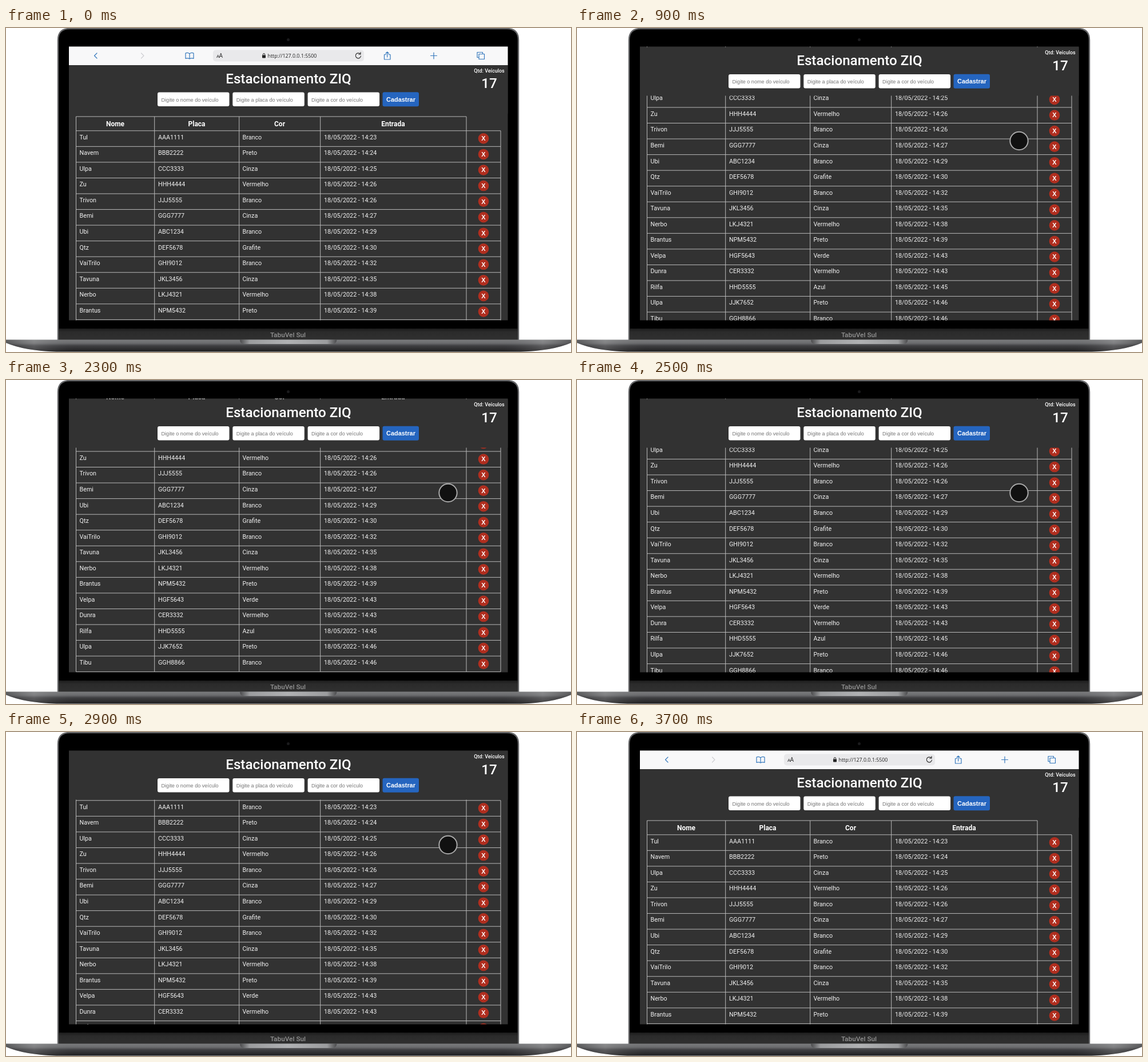
These frames come from a looping animation (988x567 px, 4.6 s). An HTML page:

```html
<!DOCTYPE html>
<html lang="pt-BR">
<head>
<meta charset="utf-8">
<title>Estacionamento</title>
<style>
  html, body { margin: 0; width: 100%; height: 100%; overflow: hidden; background: #fff; }
  svg { display: block; width: 988px; height: 567px; }
  text { font-family: Roboto, sans-serif; fill: #fff; }
  .mid { text-anchor: middle; }
  .head { font-size: 12px; font-weight: 600; }
  .cell { font-size: 10.75px; fill: #f2f2f2; }
  .hint { font: 9.1px "Liberation Sans", Arial, sans-serif; fill: #757575; }
  .button { font: bold 10.9px "Liberation Sans", Arial, sans-serif; }
  .icon { fill: none; stroke: #3578bd; stroke-width: 1.2; stroke-linecap: round; stroke-linejoin: round; }
  .grid { fill: none; stroke: #b9b9b9; stroke-width: 1; }
</style>
</head>
<body>
<svg viewBox="0 0 988 567">
  <defs>
    <clipPath id="screen"><rect x="110" y="32.500" width="767.500" height="479"/></clipPath>
    <linearGradient id="chin" x2="0" y2="1">
      <stop stop-color="#1c1c1c"/><stop offset=".3" stop-color="#2b2b2b"/><stop offset="1" stop-color="#303030"/>
    </linearGradient>
    <linearGradient id="base" x2="0" y2="1">
      <stop stop-color="#88898b"/><stop offset=".3" stop-color="#737477"/>
      <stop offset=".5" stop-color="#444447"/><stop offset="1" stop-color="#1d1d1f"/>
    </linearGradient>
    <linearGradient id="shine">
      <stop stop-color="#222" stop-opacity=".4"/><stop offset=".05" stop-color="#999" stop-opacity=".3"/>
      <stop offset=".12" stop-color="#222" stop-opacity=".12"/><stop offset=".88" stop-color="#222" stop-opacity=".12"/>
      <stop offset=".95" stop-color="#999" stop-opacity=".3"/><stop offset="1" stop-color="#222" stop-opacity=".4"/>
    </linearGradient>
    <linearGradient id="notch">
      <stop stop-color="#4a4a4c"/><stop offset=".1" stop-color="#9b9c9e"/><stop offset=".5" stop-color="#b0b1b3"/>
      <stop offset=".9" stop-color="#9b9c9e"/><stop offset="1" stop-color="#4a4a4c"/>
    </linearGradient>
    <path id="slab" d="M0 545.500H988V551Q955 565 900 566.500H88Q33 565 0 551Z"/>
  </defs>

  <!-- laptop -->
  <path d="M91 546V21Q91 1 111 1H876Q896 1 896 21V546Z" fill="#000" stroke="#666769" stroke-width="2.400"/>
  <rect x="92" y="526" width="803" height="20" fill="url(#chin)"/>
  <circle cx="493.500" cy="20.500" r="2.500" fill="#1b1b1d"/>
  <text class="mid" x="493" y="540.500" font-size="11.800" font-weight="500" style="fill:#929292">TabuVel Sul</text>
  <use href="#slab" fill="url(#base)"/>
  <use href="#slab" fill="url(#shine)"/>
  <path d="M409 545.500H578.500Q578 553 570 553H417Q409 553 409 545.500Z" fill="url(#notch)"/>

  <!-- page -->
  <g clip-path="url(#screen)">
    <rect x="110" y="32" width="768" height="480" fill="#323232"/>
    <g id="table"></g>
    <g id="header">
      <rect x="110" y="65" width="768" height="85" fill="#323232"/>
      <text class="mid" x="494" y="96.500" font-size="24.200" font-weight="500">Estacionamento ZIQ</text>
      <text class="mid" x="845" y="77.500" font-size="9" font-weight="500">Qtd: Veículos</text>
      <text class="mid" x="845" y="105.300" font-size="24.200" font-weight="500">17</text>
      <g id="form"></g>
      <rect x="658.500" y="112.300" width="63.500" height="24.900" rx="3" fill="#2565bf"/>
      <text class="mid button" x="690.500" y="128.600">Cadastrar</text>
    </g>
    <g id="bar">
      <rect x="110" y="31" width="768" height="34" fill="#f8f8f9"/>
      <rect x="362" y="38.500" width="264" height="20" rx="5" fill="#e9e9eb"/>
      <g style="fill:#222">
        <text x="368" y="52" font-size="8" style="fill:#222">A</text>
        <text x="372.500" y="52" font-size="10" style="fill:#222">A</text>
        <rect x="448" y="47.500" width="6" height="5" rx=".8"/>
        <path d="M449.300 48V46.300a1.700 1.700 0 0 1 3.400 0V48" fill="none" stroke="#222"/>
        <text x="457.500" y="52" style="font:8.85px 'Open Sans',sans-serif;fill:#222">http://127.0.0.1:5500</text>
      </g>
      <g class="icon">
        <path d="M159 44L154.500 48.500L159 53"/>
        <path d="M236.500 44L241 48.500L236.500 53" stroke="#cfcfd2"/>
        <path d="M321 45Q318 42.500 314 44V53.500Q318 52 321 54Q324 52 328 53.500V44Q324 42.500 321 45V54"/>
        <path d="M619.500 45.500A4.600 4.600 0 1 0 620.500 49M620 42.500V46H616.500" stroke="#333"/>
        <path d="M664.500 46.500H661.500V55H672V46.500H669M666.700 51V42M664 44.500L666.700 41.800L669.400 44.500"/>
        <path d="M742.500 48.500H753.500M748 43V54"/>
        <path d="M827 45.500H836.500V54.500H827ZM827 51.500H824V42.500H833.500V45.500"/>
      </g>
    </g>
    <circle id="touch" cx="773" cy="197.500" r="15.700" fill="#111" stroke="#a9a9a9" stroke-width="2"/>
  </g>
</svg>

<script>
const $ = id => document.getElementById(id);
const label = (x, y, cls, s) => `<text x="${x}" y="${y}" class="${cls}">${s}</text>`;

const cars = `Tul AAA1111 Branco 14:23
Navem BBB2222 Preto 14:24
Ulpa CCC3333 Cinza 14:25
Zu HHH4444 Vermelho 14:26
Trivon JJJ5555 Branco 14:26
Bemi GGG7777 Cinza 14:27
Ubi ABC1234 Branco 14:29
Qtz DEF5678 Grafite 14:30
VaiTrilo GHI9012 Branco 14:32
Tavuna JKL3456 Cinza 14:35
Nerbo LKJ4321 Vermelho 14:38
Brantus NPM5432 Preto 14:39
Velpa HGF5643 Verde 14:43
Dunra CER3332 Vermelho 14:43
Rilfa HHD5555 Azul 14:45
Ulpa JJK7652 Preto 14:46
Tibu GGH8866 Branco 14:46`.split("\n").map(line => line.split(" "));

const PITCH = 27.55, TOP = 179.8, END = TOP + PITCH * cars.length;

function buildTable() {
  const heads = [["Nome", 191], ["Placa", 333.5], ["Cor", 478.5], ["Entrada", 677]];
  let grid = `M122.500 155H805M865 ${TOP}V${END}`;
  for (const x of [122.5, 259.7, 407.7, 549.7, 805]) grid += `M${x} 155V${END}`;
  for (let i = 0; i <= cars.length; i++) grid += `M122.500 ${TOP + i * PITCH}H865`;

  let out = `<path class="grid" d="${grid}"/>`;
  for (const [s, x] of heads) out += label(x, 171.8, "mid head", s);
  cars.forEach(([name, plate, color, time], i) => {
    const y = TOP + i * PITCH, base = y + 14.9;
    out += label(128.5, base, "cell", name) + label(266, base, "cell", plate)
      + label(413.5, base, "cell", color) + label(556, base, "cell", `18/05/2022 - ${time}`)
      + `<circle cx="835" cy="${y + 13.6}" r="9.300" fill="#b02e1f"/>`
      + label(835, y + 17.5, "mid button", "X");
  });
  $("table").innerHTML = out;
}

function buildForm() {
  $("form").innerHTML = ["o nome", "a placa", "a cor"].map((s, i) => {
    const x = 265 + i * 131.3;
    return `<rect x="${x}" y="112.500" width="125.500" height="24.500" rx="3" fill="#fff"/>`
      + label(x + 6.5, 128.5, "hint", `Digite ${s} do veículo`);
  }).join("");
}

// [time, scroll]: two swipes down, two swipes up
const swipes = [[200, 0], [300, 20], [400, 65], [500, 85], [600, 85], [900, 123.5], [1000, 136],
  [1100, 144], [1200, 148], [2200, 148], [2300, 137.5], [2400, 128], [2500, 124], [2600, 124],
  [2700, 115], [2800, 88], [2900, 60], [3000, 27], [3100, 10], [3200, 0], [4600, 0]];

function scrollAt(t) {
  const i = swipes.findIndex(k => k[0] > t);
  if (i < 1) return 0;
  const [t0, a] = swipes[i - 1], [t1, b] = swipes[i];
  return a + (b - a) * (t - t0) / (t1 - t0);
}

const clamp = v => Math.max(0, Math.min(1, v));
const shift = (id, y) => $(id).setAttribute("transform", `translate(0 ${-y})`);

function draw(now) {
  const t = Math.floor(now % 4600 / 100) * 100;
  const scroll = scrollAt(t);
  const fold = Math.min(31.5, scroll * 0.55); // the toolbar folds away first
  shift("table", scroll);
  shift("header", fold);
  shift("bar", fold);
  $("bar").style.display = fold < 31.5 ? "" : "none";
  $("touch").style.opacity = Math.min(clamp((t - 200) / 300), clamp((3700 - t) / 300));
}

buildTable();
buildForm();
let start;
function tick(now) {
  start ??= now;
  draw(now - start);
  requestAnimationFrame(tick);
}
draw(0);
requestAnimationFrame(tick);
</script>
</body>
</html>
```
